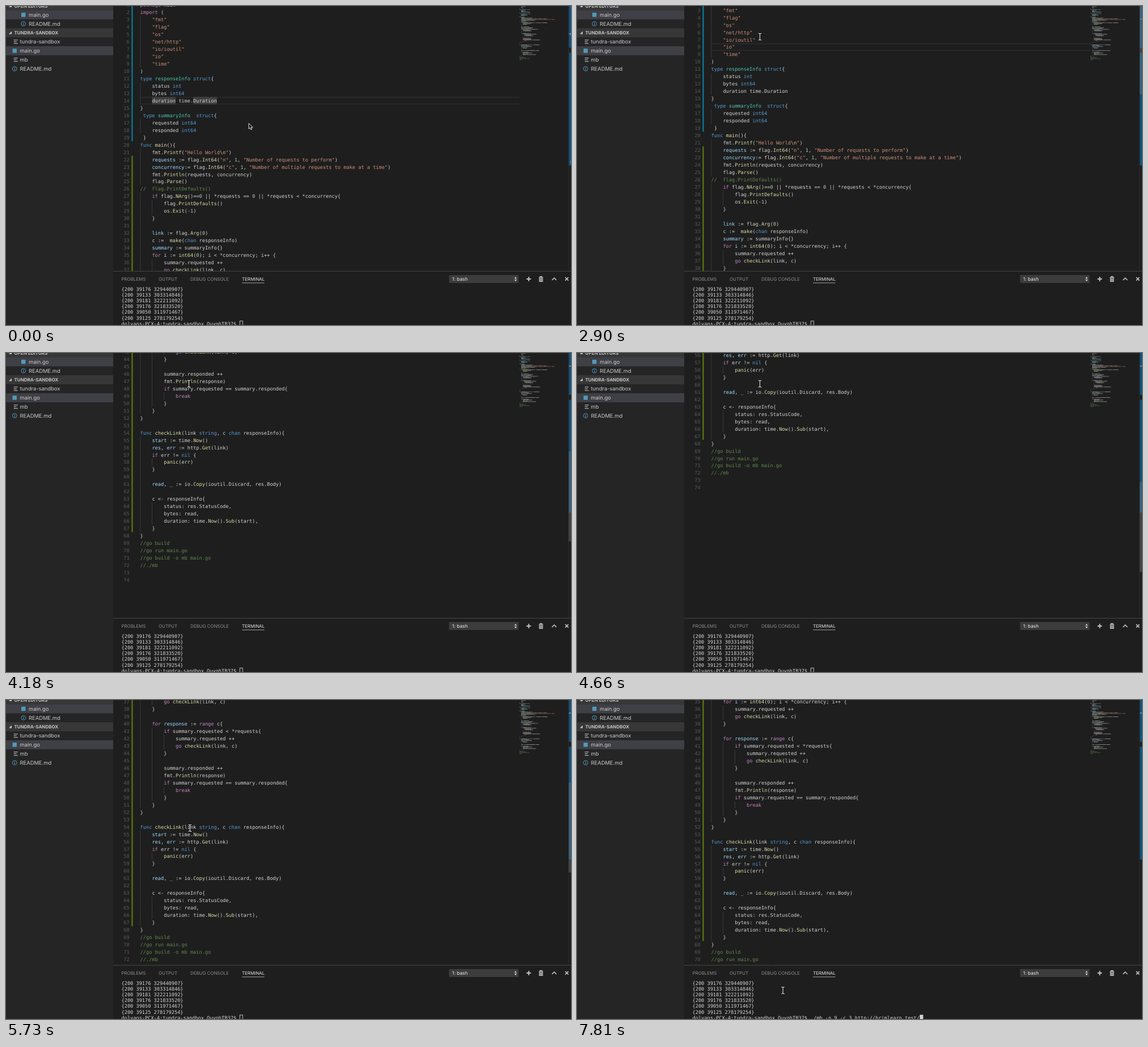
Animation of 996 by 562 pixels, one loop 8 s. Source, as an HTML page:

```html
<!DOCTYPE html>
<html lang="en">
<head>
<meta charset="utf-8">
<title>Code editor</title>
<style>
  html, body { margin: 0; width: 100%; height: 100%; overflow: hidden; background: #1e1e1e; }
  svg { display: block; width: 996px; height: 562px; }
  text { white-space: pre; text-rendering: geometricPrecision; }
  .mono { font: 8.65px "DejaVu Sans Mono", monospace; fill: #d4d4d4; }
  .num { fill: #5a5a5a; text-anchor: end; }
  .ui { font: 9.4px Inter, sans-serif; fill: #cccccc; }
  .head { font: bold 8px Inter, sans-serif; fill: #c4c4c4; }
  .tab { font: 7.9px Inter, sans-serif; fill: #8f8f8f; }
  .on { fill: #e7e7e7; }
  .icon { fill: none; stroke: #c5c5c5; stroke-width: 1.3; }
</style>
</head>
<body>
<svg viewBox="0 0 996 562">
  <rect width="996" height="562" fill="#1e1e1e"/>
  <g id="code">
    <g id="lineMark" fill="#2e2e2e">
      <rect x="236" width="669" height="1.2"/>
      <rect x="236" y="11.8" width="669" height="1.2"/>
    </g>
    <g id="words" fill="#3f3f3f"></g>
    <g id="lines"></g>
    <g id="brackets" fill="#006400" fill-opacity=".1" stroke="#888" stroke-width=".8"></g>
    <rect id="caret" width="1.4" height="13" fill="#dcdcdc"/>
  </g>
  <g id="minimap" opacity=".55"></g>
  <rect x="991.4" width=".8" height="467" fill="#343434"/>
  <g id="ruler"></g>
  <rect id="cursorTick" x="992.3" width="4" height="1.5" fill="#a0a0a0" fill-opacity=".8"/>
  <rect id="slider" x="992" width="4" height="158.5" fill="#797979" fill-opacity=".4"/>

  <rect width="189" height="562" fill="#252526"/>
  <g id="sidebar"></g>

  <rect x="189" y="467" width="807" height="95" fill="#1e1e1e"/>
  <rect x="189" y="466.8" width="807" height=".9" fill="#4a4a4a"/>
  <g class="tab">
    <text x="203.5" y="483.6">PROBLEMS</text>
    <text x="269" y="483.6">OUTPUT</text>
    <text x="325" y="483.6">DEBUG CONSOLE</text>
    <text x="416" y="483.6" class="on">TERMINAL</text>
  </g>
  <rect x="416" y="487.4" width="39.4" height=".9" fill="#b0b0b0"/>
  <rect x="781" y="474" width="122.5" height="14" fill="#3c3c3c"/>
  <text x="786.5" y="483.8" class="tab" style="fill:#f0f0f0;font-size:8.4px">1: bash</text>
  <path d="M896.2 480.2l2.1-3 2.1 3zM896.2 482l2.1 3 2.1-3z" fill="#e0e0e0"/>
  <g class="icon">
    <path d="M917.6 481h7.8M921.5 477.1v7.8" stroke-width="1.9"/>
    <path d="M939.4 478.2h7.4M941.6 478v-1.4h3V478M940.4 479v6.3h5.4V479M942.2 479.5v5M944 479.5v5"/>
    <path d="M962.5 483l3.9-3.9 3.9 3.9" stroke-width="1.5"/>
    <path d="M985.8 478l5.6 5.6M991.4 478l-5.6 5.6" stroke-width="1.7"/>
  </g>
  <g id="term" class="mono"></g>
  <text id="typed" class="mono" x="411.8" y="562.7"></text>
  <rect id="block" y="555" width="5" height="10" stroke="#d4d4d4" stroke-width=".9"/>

  <path id="arrow" d="M0 0V9.8L2.3 7.7 3.8 11.2 5.5 10.4 4 7.1H7.1Z" fill="#111" stroke="#fff" stroke-width=".9"/>
  <g id="beam" fill="none">
    <path d="M-2.8-6Q0-6 0-4.4 0-6 2.8-6M0-4.8V4.8M-2.8 6Q0 6 0 4.4 0 6 2.8 6" stroke="#111" stroke-width="2.2"/>
    <path d="M-2.8-6Q0-6 0-4.4 0-6 2.8-6M0-4.8V4.8M-2.8 6Q0 6 0 4.4 0 6 2.8 6" stroke="#eee" stroke-width="1.1"/>
  </g>
</svg>
<script>
const LOOP = 8000, TOP = -8.4, LH = 12.97, CW = 5.207, LEFT = 236.6, TICK = 4.32;

const source = String.raw`package main
import (
    "fmt"
    "flag"
    "os"
    "net/http"
    "io/ioutil"
    "io"
    "time"
)
type responseInfo struct{
    status int
    bytes int64
    duration time.Duration
}
 type summaryInfo  struct{
    requested int64
    responded int64
 }
func main(){
    fmt.Printf("Hello World\n")
    requests := flag.Int64("n", 1, "Number of requests to perform")
    concurrency:= flag.Int64("c", 1, "Number of multiple requests to make at a time")
    fmt.Println(requests, concurrency)
    flag.Parse()
//  flag.PrintDefaults()
    if flag.NArg()==0 || *requests == 0 || *requests < *concurrency{
        flag.PrintDefaults()
        os.Exit(-1)
    }

    link := flag.Arg(0)
    c :=  make(chan responseInfo)
    summary := summaryInfo{}
    for i := int64(0); i < *concurrency; i++ {
        summary.requested ++
        go checkLink(link, c)
    }

    for response := range c{
        if summary.requested < *requests{
            summary.requested ++
            go checkLink(link, c)
        }

        summary.responded ++
        fmt.Println(response)
        if summary.requested == summary.responded{
            break
        }
    }
}

func checkLink(link string, c chan responseInfo){
    start := time.Now()
    res, err := http.Get(link)
    if err != nil {
        panic(err)
    }

    read, _ := io.Copy(ioutil.Discard, res.Body)

    c <- responseInfo{
        status: res.StatusCode,
        bytes: read,
        duration: time.Now().Sub(start),
    }
}
//go build
//go run main.go
//go build -o mb main.go
//./mb

`.split('\n');

const rules = [
  ['#608b4e', String.raw`\/\/.*`],
  ['#ce9178', String.raw`"[^"\\]*(?:"|(?=\\))|"`],
  ['#d7ba7d', String.raw`\\n`],
  ['#c586c0', String.raw`\b(?:package|import|if|for|go|break|range)\b`],
  ['#569cd6', String.raw`\b(?:func|type|struct|chan|string|nil|int|int64(?!\())\b`],
  ['#4ec9b0', String.raw`(?<=type )\w+`],
  ['#dcdcaa', String.raw`\w+(?=\()`],
  ['#9cdcfe', String.raw`\b\w+(?=(?:, \w+)* ?:=)`],
  ['#b5cea8', String.raw`\b\d+\b`],
];
const lexer = new RegExp(rules.map(r => `(${r[1]})`).join('|'), 'g');

const $ = id => document.getElementById(id);
const esc = s => s.replace(/&/g, '&amp;').replace(/</g, '&lt;');
const lineY = n => TOP + (n - 1) * LH;
const colX = c => LEFT + c * CW;
const tickY = n => TOP + (n - 1) * TICK;
const rect = (x, y, w, h, fill) =>
  `<rect x="${x}" y="${y}" width="${w}" height="${h}"${fill ? ` fill="${fill}"` : ''}/>`;
const label = (x, y, s, cls) => `<text x="${x}" y="${y}" class="${cls}">${esc(s)}</text>`;

function tokens(s) {
  const out = [];
  let pos = 0;
  for (const m of s.matchAll(lexer)) {
    if (m.index > pos) out.push(['#d4d4d4', s.slice(pos, m.index), pos]);
    out.push([rules[m.slice(1).findIndex(g => g !== undefined)][0], m[0], m.index]);
    pos = m.index + m[0].length;
  }
  if (pos < s.length) out.push(['#d4d4d4', s.slice(pos), pos]);
  return out;
}

const indentOf = s => s ? s.search(/\S/) : 0;
const depth = i => {
  const near = source[i] ? [source[i]] : [source[i - 1], source[i + 1] || ''];
  return Math.floor(Math.min(...near.map(indentOf)) / 4);
};

function buildCode() {
  let code = '', map = '';
  source.forEach((s, i) => {
    const n = i + 1, y = lineY(n), pad = indentOf(s);
    for (let d = 0; d < depth(i); d++) code += rect(colX(d * 4) - .2, y, .8, LH, '#404040');
    code += label(217.6, y + 9.6, String(n), 'mono num');
    if (!s) return;
    const parts = tokens(s);
    code += `<text class="mono" x="${colX(pad)}" y="${y + 9.6}">` + parts.map(([c, t, at]) =>
      `<tspan fill="${c}">${esc(at ? t : t.trimStart())}</tspan>`).join('') + '</text>';
    for (const [c, t, at] of parts)
      for (const w of t.matchAll(/\S+/g))
        map += rect(905.3 + (at + w.index) * .72, TOP + i * 1.44, w[0].length * .72, 1, c);
  });
  code += rect(221.3, lineY(1), 2.2, 19 * LH, '#0c7d9d') + rect(221.3, lineY(22), 2.2, 46 * LH, '#587c0c');
  $('lines').innerHTML = code;
  $('minimap').innerHTML = map;
  $('words').innerHTML = [4, 18].map(c => rect(colX(c), lineY(14), 8 * CW, LH)).join('');
  $('brackets').innerHTML = [[24, 11], [0, 15]]
    .map(([c, n]) => rect(colX(c), lineY(n) + .4, CW, LH - .8)).join('');
  $('ruler').innerHTML = rect(992.4, tickY(1), 3.6, 19 * TICK, '#0c5586') +
    rect(992.4, tickY(22), 3.6, 46 * TICK, '#0c5586') +
    `<g id="wordTicks">${[14, 66].map(n => rect(995, tickY(n), 1, TICK, '#868686')).join('')}</g>`;
}

function buildSidebar() {
  const rowY = r => -.3 + r * 15.83;
  const twist = r => `<path d="M5 ${rowY(r) + 2.2}h5v-5z" fill="#c5c5c5"/>`;
  const icons = {
    go: (x, y) => rect(x - 3.7, y - 3.7, 7.4, 7.4, '#519aba'),
    text: (x, y) => [[-3, 7], [0, 5], [3, 7]].map(([d, w]) => rect(x - 1.5, y + d - .6, w, 1.1, '#bcc3c6')).join(''),
    info: (x, y) => `<circle cx="${x}" cy="${y}" r="3.9" fill="none" stroke="#519aba"/>` +
      rect(x - .5, y - 2.3, 1.1, 1.1, '#519aba') + rect(x - .5, y - .6, 1.1, 3, '#519aba'),
  };
  const row = (r, kind, x, name) => icons[kind](x - 9.3, rowY(r)) + label(x, rowY(r) + 3.4, name, 'ui');
  const band = (r, c) => rect(0, rowY(r) - 7.9, 189, 15.83, c);
  $('sidebar').innerHTML = band(0, '#373738') + band(1, '#3f3f46') + band(3, '#373738') + band(5, '#3f3f46') +
    twist(0) + label(14.5, rowY(0) + 2.9, 'OPEN EDITORS', 'head') +
    row(1, 'go', 40, 'main.go') + row(2, 'info', 40, 'README.md') +
    twist(3) + label(14.5, rowY(3) + 2.9, 'TUNDRA-SANDBOX', 'head') +
    row(4, 'text', 24.5, 'tundra-sandbox') + row(5, 'go', 24.5, 'main.go') +
    row(6, 'text', 24.5, 'mb') + row(7, 'info', 24.5, 'README.md');
}

function buildTerminal() {
  const out = ['39176 329440907', '39133 303314846', '39181 322211092',
    '39176 321833520', '39050 311971467', '39125 278179254'].map(s => `{200 ${s}}`);
  out.push('dolvans-PCX-4:tundra-sandbox QuynhTB37$');
  $('term').innerHTML = out.map((s, i) => label(203.5, 501.9 + i * 10.13, s, '')).join('');
}

// Each row: start time, then the values held until the next row.
const mouse = [[0, 428, 206.7], [290, 432, 211.5], [720, 416, 206], [880, 390, 198], [1040, 354, 190],
  [1210, 312, 184], [1370, 276, 181], [1530, 262, 180], [1700, 288, 158], [1850, 320, 114],
  [2000, 331.7, 94.5], [2450, 328, 76], [2600, 322.4, 54.2], [5260, 322.4, 80], [5500, 323, 160],
  [5730, 324.3, 225.5], [6320, 334, 310], [6500, 352, 440], [6680, 363, 511.5]];
const scroll = [[0, 0], [2900, 16.5], [3080, 90], [3290, 205], [3560, 302], [3940, 410], [4180, 545],
  [4420, 660], [4660, 707.6], [4900, 718], [5260, 660], [5500, 560], [5730, 462], [5970, 436]];
const slider = [[0, 0], [720, 1], [7040, .65], [7360, .3], [7510, 0]];
const caret = [[0, 14, -1], [1530, 15, 1], [1850, 15, -1], [2000, 8, 8], [2450, 8, -1]];
const command = './mb -n 9 -c 3 http://brimlearn.test/';
const typing = [[0, 0, 0], [7360, 36, 37], [7810, 37, 37]];

const at = (rows, t) => rows.findLast(r => r[0] <= t);
const show = (id, on) => $(id).setAttribute('visibility', on ? 'visible' : 'hidden');
const move = (id, x, y) => $(id).setAttribute('transform', `translate(${x} ${y})`);

function draw(t) {
  const [, mx, my] = at(mouse, t);
  move('arrow', mx, my);
  move('beam', mx, my);
  show('arrow', t < 290);
  show('beam', t >= 290);

  const [, top] = at(scroll, t);
  move('code', 0, -top);
  move('slider', 0, TOP + top * TICK / LH);
  $('slider').setAttribute('opacity', at(slider, t)[1]);

  const [, line, col] = at(caret, t);
  move('lineMark', 0, lineY(line));
  move('cursorTick', 0, tickY(line) + .4);
  move('caret', colX(Math.max(col, 0)) + .3, lineY(line));
  show('caret', col >= 0);
  show('words', line === 14);
  show('wordTicks', line === 14);
  show('brackets', t >= 1700 && t < 2150);

  const [, chars, end] = at(typing, t);
  $('typed').textContent = command.slice(0, chars);
  $('block').setAttribute('x', 412.2 + end * CW);
  $('block').setAttribute('fill', t >= 7040 ? '#d4d4d4' : 'none');
}

buildCode();
buildSidebar();
buildTerminal();
const start = performance.now();
function frame() {
  draw((performance.now() - start) % LOOP);
  requestAnimationFrame(frame);
}
frame();
</script>
</body>
</html>
```
